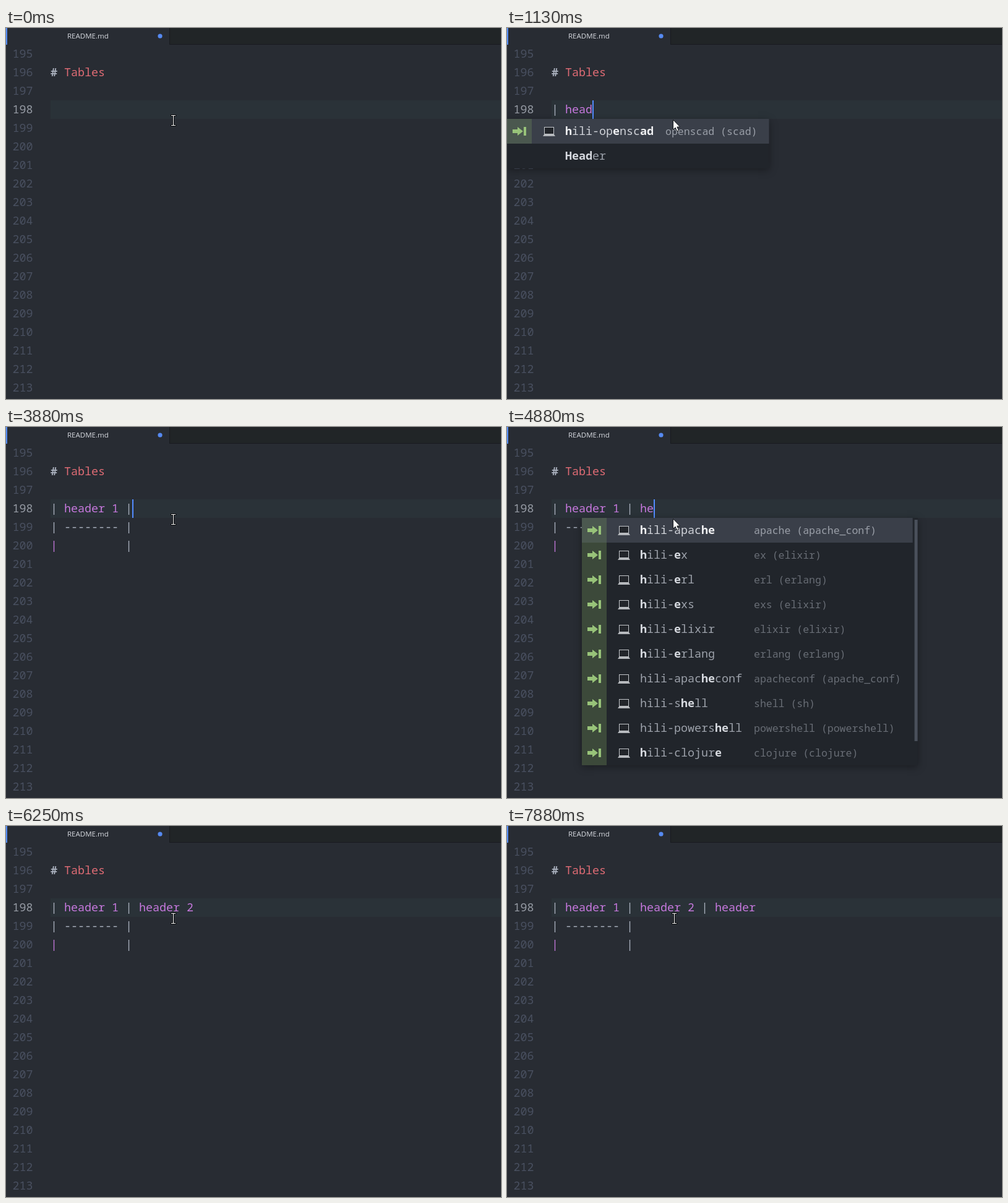
Animation, 800 px wide and 600 px high, one loop 8 s. Source, as an HTML page with a canvas:

```html
<!DOCTYPE html>
<html lang="en">
<head>
<meta charset="utf-8">
<title>Markdown table typing</title>
<style>
  html, body { margin: 0; width: 100%; height: 100%; overflow: hidden; background: #282c33; }
  canvas { display: block; }
</style>
</head>
<body>
<canvas id="stage" width="800" height="600"></canvas>
<script>
const ctx = document.getElementById("stage").getContext("2d");
const LOOP = 8000, CHAR = 11, LABEL_CHAR = 9.9, LEFT = 72, LINE = 30, ROW = 40, POPUP_TOP = 147;
const MONO = '"Noto Sans Mono", monospace';
const CODE = `18.33px ${MONO}`, BOLD = `bold ${CODE}`, LABEL = `16.5px ${MONO}`;
const GREY = "#abb2bf", PURPLE = "#c678dd", RED = "#e06c75", BLUE = "#528bff";

// Suggestions for each typed prefix, as "name language".
const suggestions = {
  h: ["1c 1c", "abnf abnf", "accesslog accesslog", "ada ada", "arduino arduino", "armasm armasm",
      "actionscript actionscript", "apache apache_conf", "as actionscript", "awk awk"],
  he: ["apache apache_conf", "ex elixir", "erl erlang", "exs elixir", "elixir elixir", "erlang erlang",
       "apacheconf apache_conf", "shell sh", "powershell powershell", "clojure clojure"],
  hea: ["openscad scad", "erlang erlang", "leaf leaf", "clean clean", "freepascal delphi",
        "mathematica mathematica", "erlang-repl erlang_repl", "Header"],
  head: ["openscad scad", "Header"],
  heade: ["Header"]
};
const minWidth = { hea: 620 };

// Typing states: time, text of the edited line, caret shown, optional caret [line, column].
const one = "| header 1 |", two = one + " header 2";
const states = [
  [0, "", false], [130, "", true], [380, "|", true], [500, "| ", true],
  ...typeHeader("| ", [750, 880, 1000, 1130, 1250, 1380]),
  [1500, "| header ", true], [1630, "| header 1", true], [1750, "| header 1 ", true],
  [1880, "| header 1 ", false],
  [2130, one, true], [2380, one, false], [2630, one, true], [2880, one, false], [3000, one, true],
  [3250, one, true, [200, 2]], [3500, one, true, [199, 12]], [3750, one, true],
  [4130, one + " ", true], [4380, one + " ", false], [4500, one + " ", true],
  ...typeHeader(one + " ", [4750, 4880, 5000, 5130, 5250, 5500]),
  [5630, one + " header ", true], [5880, two, true], [6130, two, false], [6380, two + " ", true],
  [6500, two + " |", true], [6630, two + " | ", true],
  ...typeHeader(two + " | ", [7000, 7130, 7250, 7380, 7500, 7630]),
  [7880, two + " | header", false]
];

function typeHeader(before, times) {
  return times.map((t, i) => [t, before + "header".slice(0, i + 1), true]);
}

function box(x, y, w, h, color) {
  ctx.fillStyle = color;
  ctx.fillRect(x, y, w, h);
}

function put(text, x, y, color, font = CODE) {
  ctx.font = font;
  ctx.fillStyle = color;
  ctx.fillText(text, x, y);
}

function shape(points, fill, stroke) {
  ctx.beginPath();
  points.forEach(([x, y]) => ctx.lineTo(x, y));
  ctx.closePath();
  ctx.fillStyle = fill;
  ctx.fill();
  if (stroke) {
    ctx.strokeStyle = stroke;
    ctx.lineWidth = 1;
    ctx.stroke();
  }
}

const lineTop = n => 27 + (n - 195) * LINE;

function codeLine(text, n, color, pipeColor = GREY) {
  const y = lineTop(n) + 21;
  put(text.replace(/\|/g, " "), LEFT, y, color);
  put(text.replace(/[^|]/g, " "), LEFT, y, pipeColor);
}

function tabBar() {
  box(0, 0, 800, 27, "#212527");
  box(264, 26, 536, 1, "#181a1f");
  box(0, 0, 264, 27, "#282c33");
  box(264, 0, 1, 27, "#181a1f");
  box(0, 0, 2, 27, BLUE);
  put("README.md", 99, 17, "#d7dae0", '11.5px "Open Sans", sans-serif');
  ctx.fillStyle = "#568af2";
  ctx.beginPath();
  ctx.arc(249, 13, 3.6, 0, 7);
  ctx.fill();
}

function snippetIcons(x, y) {
  shape([[9, -3], [17, -3], [17, -7], [26, 0], [17, 7], [17, 3], [9, 3]].map(([a, b]) => [x + a, y + b]), "#98c379");
  box(x + 27, y - 7, 4, 14, "#98c379");
  box(x + 60, y - 7, 16, 12, "#c3c6ca");
  box(x + 61, y - 6, 14, 10, "#22252a");
  shape([[60, 5], [76, 5], [78, 8], [58, 8]].map(([a, b]) => [x + a, y + b]), "#b5b8bc");
}

// Columns of the letters that match the typed word.
function matches(name, word) {
  const lower = name.toLowerCase(), found = new Set();
  const whole = lower.indexOf(word);
  let at = whole;
  [...word].forEach((c, i) => {
    at = whole >= 0 ? whole + i : lower.indexOf(c, i ? at + 1 : 0);
    found.add(at);
  });
  return found;
}

function popup(word, x) {
  const items = suggestions[word].map(item => {
    const [name, language] = item.split(" ");
    return language ? { name: "hili-" + name, label: `${name} (${language})` } : { name, label: "" };
  });
  const longest = key => Math.max(...items.map(item => item[key].length));
  const labelX = x + 94 + longest("name") * CHAR + 19;
  const width = Math.max(minWidth[word] || 0, labelX - x + longest("label") * LABEL_CHAR + 19);
  const scrolls = items.length > 9;

  ctx.save();
  ctx.shadowColor = "rgba(0,0,0,.35)";
  ctx.shadowBlur = 12;
  ctx.shadowOffsetY = 3;
  box(x, POPUP_TOP, width + (scrolls ? 8 : 0), items.length * ROW, "#21252b");
  ctx.restore();

  items.forEach(({ name, label }, i) => {
    const top = POPUP_TOP + i * ROW, selected = i === 0, bold = matches(name, word);
    if (selected) {
      box(x, top, width, ROW, "#3a3f49");
      bold.add(0);
    }
    if (label) {
      box(x, top, 40, ROW, selected ? "#4b584f" : "#3c493a");
      snippetIcons(x, top + 20);
    }
    const pick = wanted => [...name].map((c, k) => bold.has(k) === wanted ? c : " ").join("");
    put(pick(false), x + 94, top + 26, selected ? "#d0d3d9" : "#9da2ab");
    put(pick(true), x + 94, top + 26, selected ? "#f0f1f3" : "#d7dae0", BOLD);
    put(label, labelX, top + 26, selected ? "#9a9fa8" : "#686d75", LABEL);
  });
  if (scrolls) box(x + width + 3, 150, 5, 358, "#4a505b");
}

function arrowPointer() {
  shape([[268.5, 148.5], [268.5, 164.5], [272, 161], [275, 167], [277.5, 166], [274.8, 160], [279.5, 160]],
    "#fff", "#15181c");
}

function textPointer() {
  for (const [grow, color] of [[1, "#0c0e10"], [0, "#fff"]]) {
    for (const [x, y, w, h] of [[267, 141, 7, 1], [270, 141, 1, 16], [267, 157, 7, 1]]) {
      box(x - grow, y - grow, w + 2 * grow, h + 2 * grow, color);
    }
  }
}

function draw(t) {
  const [, text, caretOn, [line, column] = [198, text.length]] = states.findLast(s => s[0] <= t);
  box(0, 0, 800, 600, "#282c33");
  box(LEFT, lineTop(line), 800 - LEFT, LINE, "#2a3238");
  tabBar();
  for (let n = 195; n <= 213; n++) put(n, 10.5, lineTop(n) + 21, n === line ? "#969ba4" : "#495060");
  put("#", LEFT, 78, GREY, BOLD);
  put("Tables", LEFT + 2 * CHAR, 78, RED);
  codeLine(text, 198, PURPLE);
  if (t >= 3250) {
    codeLine("| -------- |", 199, GREY);
    codeLine("|", 200, PURPLE, PURPLE);
    codeLine("           |", 200, PURPLE);
  }
  if (caretOn) box(LEFT + column * CHAR, lineTop(line), 2, LINE, BLUE);

  const word = (text.match(/[a-z]+$/) || [""])[0];
  if (suggestions[word]) {
    popup(word, LEFT + (text.length - word.length) * CHAR - 94);
    arrowPointer();
  } else {
    textPointer();
  }
}

function tick(now) {
  draw(now % LOOP);
  requestAnimationFrame(tick);
}
requestAnimationFrame(tick);
</script>
</body>
</html>
```
